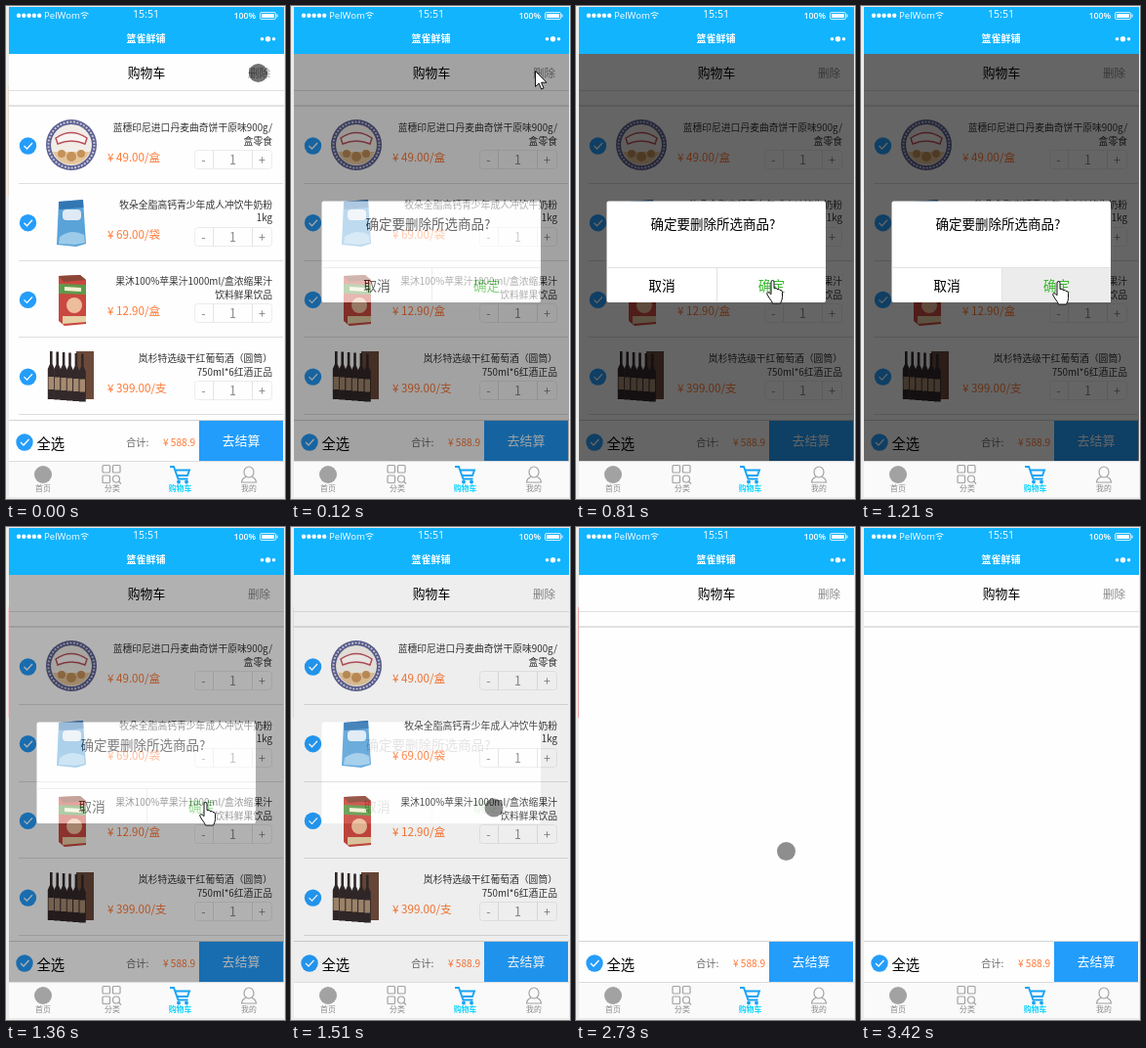
An HTML page for the animation above (3700 ms loop, 286 by 504 pixels).

```html
<!DOCTYPE html>
<html lang="zh-CN">
<head>
<meta charset="utf-8">
<title>购物车</title>
<style>
html, body { margin: 0; width: 100%; height: 100%; overflow: hidden; background: #ececea; }
svg { display: block; width: 286px; height: 504px; font-family: "Noto Sans CJK SC", "Noto Sans CJK", sans-serif; }
.latin { font-family: "Open Sans", "Noto Sans", sans-serif; }
.mid { text-anchor: middle; }
.end { text-anchor: end; }
.line { fill: none; stroke: #a2a2a2; }
.price { fill: #ff7733; }
</style>
</head>
<body>
<svg viewBox="0 0 286 504">
  <defs>
    <g id="check">
      <circle r="8.700" fill="#259dfb"/>
      <path d="M-4 0l3 3L4.500-3" fill="none" stroke="#fff" stroke-width="1.300"/>
    </g>
    <g id="photo0">
      <circle cx="67" cy="142" r="26" fill="#5a5f93"/>
      <circle cx="67" cy="142" r="23.500" fill="none" stroke="#c9c6d2" stroke-width="2" stroke-dasharray="2 1.500"/>
      <circle cx="67" cy="142" r="21" fill="#f1ece6"/>
      <path d="M51 135q16-11 32 0l-2 6q-14-6-28 0z" fill="#f8f4f2" stroke="#b8505c" stroke-width="1.500"/>
      <path d="M48 149h38q-6 13-19 13t-19-13z" fill="#e6c59a"/>
      <g fill="#c4925a"><circle cx="57" cy="151" r="4"/><circle cx="67" cy="154" r="5"/><circle cx="77" cy="151" r="4"/></g>
    </g>
    <g id="photo1">
      <path d="M54 200l25-2 3 45-10 3-20-2z" fill="#5aa3d8"/>
      <path d="M54 200l25-2 .5 8-25 2z" fill="#3276b4"/>
      <rect x="58" y="208" width="19" height="11" rx="4" fill="#dfeaf4"/>
      <path d="M55 236q12-9 25-2l1 8-10 2-17-1z" fill="#9ccbea"/>
    </g>
    <g id="photo2">
      <path d="M54 276l22-1 6 5v45l-22 2-6-5z" fill="#c9483f"/>
      <path d="M54 276l22-1 6 5-23 2z" fill="#8a4636"/>
      <path d="M54 284l28 1v10l-28-1z" fill="#5f9a4a"/>
      <path d="M60 287l17 1v4l-17-1z" fill="#f2efd2"/>
      <circle cx="70" cy="306" r="8" fill="#eebd9c"/>
      <path d="M58 317h24v6l-24 2z" fill="#e7cfa6"/>
    </g>
    <g id="photo3">
      <path d="M72 353h18v49H72z" fill="#6b4a3a"/>
      <g id="bottles"></g>
    </g>
    <path id="arrow" d="M.5.5V16.500L4.200 13 6.700 19 9 18 6.600 12.200H12z" fill="#fff" stroke="#111"/>
    <path id="hand" d="M5 2q0-1.500 1.500-1.500T8 2v6.500q3-1 3 1 3-.5 3 1 2.500-.3 2.500 2v5q0 3-2 6.500h-8q-1-3-3-5l-2.500-4q-1-2 .8-2.300 1.500 0 3.200 2z" fill="#fff" stroke="#111"/>
    <circle id="dot" r="9.500"/>
  </defs>

  <rect x="3" y="1" width="282" height="501" fill="#fefefe"/>
  <rect id="edge" x="2" y="82" width="1" height="113"/>

  <!-- header -->
  <rect x="3" y="1" width="282" height="48" fill="#12b4fe"/>
  <g fill="#fff">
    <path d="M13 9.700h22" stroke="#fff" stroke-width="4.400" stroke-linecap="round" stroke-dasharray="0 5.300"/>
    <text class="latin" x="39" y="12.500" font-size="9.600">PelWom</text>
    <path d="M76.500 8q4-3 8 0M78 10q2.500-2 5 0" fill="none" stroke="#fff"/>
    <circle cx="80.500" cy="12" r="1"/>
    <text class="latin mid" x="143.500" y="12.300" font-size="10.600">15:51</text>
    <text class="latin" x="233.500" y="13" font-size="8.800" font-weight="600">100%</text>
    <rect x="260.500" y="6.500" width="16" height="7" rx="1.500" fill="none" stroke="#fff" stroke-width=".8"/>
    <path d="M262 8h13v4h-13zM277.500 8.500h1v3h-1z"/>
    <text class="mid" x="143.500" y="37" font-size="10" font-weight="700">篮雀鲜铺</text>
    <circle cx="262.500" cy="33.700" r="1.800"/><circle cx="268.500" cy="33.700" r="2.700"/><circle cx="274.500" cy="33.700" r="1.800"/>
  </g>
  <text class="mid" x="144" y="73" font-size="12.800">购物车</text>
  <text x="248" y="72.500" font-size="11.500" fill="#888">删除</text>
  <path d="M3 86.500H285" stroke="#e0e0e0"/>
  <path d="M3 102H285" stroke="#c6c6c6"/>

  <g id="items"></g>

  <!-- checkout bar -->
  <path d="M3 423.500H285" stroke="#d4d4d4"/>
  <use href="#check" x="19" y="446"/>
  <text x="31.500" y="453" font-size="14.300">全选</text>
  <text x="123" y="449.500" font-size="10.300" fill="#666">合计:</text>
  <text class="price" x="161" y="450" font-size="10.100">¥ 588.9</text>
  <rect x="198" y="424" width="86" height="41" fill="#229dfc"/>
  <text class="mid" x="241" y="448.500" font-size="13" fill="#fff">去结算</text>

  <!-- tabs -->
  <rect x="3" y="465" width="282" height="37" fill="#fafafa"/>
  <path d="M3 465.500H285" stroke="#dcdcdc"/>
  <circle cx="38" cy="479" r="9" fill="#a2a2a2"/>
  <g class="line" stroke-width="1.200">
    <rect x="99" y="469.500" width="7.500" height="7.500" rx="1"/>
    <rect x="109.500" y="469.500" width="7.500" height="7.500" rx="1"/>
    <rect x="99" y="480" width="7.500" height="7.500" rx="1"/>
    <circle cx="113" cy="483.500" r="3.500"/><path d="M115.500 486l2.500 2.500"/>
    <ellipse cx="249" cy="476.500" rx="5" ry="5.500"/>
    <path d="M246 481.500q-4 1-4.500 5.500h15q-.5-4.500-4.500-5.500"/>
  </g>
  <g fill="none" stroke="#18a4f4" stroke-width="1.900">
    <path d="M168 471h4l4.500 12.500h10M173.500 474.500h14.500l-2 5.500h-10.500"/>
    <circle cx="177" cy="486.500" r="1"/><circle cx="185" cy="486.500" r="1"/>
  </g>
  <g class="mid" font-size="7.900" fill="#888">
    <text x="38" y="496">首页</text><text x="109" y="496">分类</text>
    <text x="178.500" y="496" fill="#10d4ff" font-weight="700">购物车</text><text x="249" y="496">我的</text>
  </g>

  <!-- confirmation -->
  <g id="modal">
    <rect x="3" y="49" width="282" height="416" opacity=".6"/>
    <rect x="31.500" y="199.500" width="224.500" height="103.500" rx="2" fill="#fff"/>
    <rect id="pressed" x="144" y="268" width="112" height="35" fill="#ececec"/>
    <path d="M31.500 267.500H256M144.500 268V303" stroke="#e2e2e2"/>
    <text x="76.500" y="228" font-size="13.500">确定要删除所选商品?</text>
    <text class="mid" x="88" y="290.500" font-size="13.800">取消</text>
    <text class="mid" x="200.500" y="290.500" font-size="13.800" fill="#35b82c">确定</text>
  </g>
  <use id="cursor"/>
</svg>
<script>
const $ = id => document.getElementById(id);
const LOOP = 3700;

const products = [
  ["蓝穗印尼进口丹麦曲奇饼干原味900g/", "盒零食", "49.00/盒"],
  ["牧朵全脂高钙青少年成人冲饮牛奶粉", "1kg", "69.00/袋"],
  ["果沐100%苹果汁1000ml/盒浓缩果汁", "饮料鲜果饮品", "12.90/盒"],
  ["岚杉特选级干红葡萄酒（圆筒）", "750ml*6红酒正品", "399.00/支"]
];

const row = ([first, second, price], i) => {
  const y = 143 + i * 78.7;
  return `<use href="#check" x="22.500" y="${y}"/><use href="#photo${i}"/>
    <g class="end" font-size="9.800" fill="#333">
      <text x="273" y="${y - 15}">${first}</text><text x="273" y="${y - 1.5}">${second}</text>
    </g>
    <text class="price" x="104" y="${y + 16}" font-size="11.600">¥ ${price}</text>
    <g transform="translate(193.500 ${Math.round(y) + 4.5})">
      <rect width="79" height="19" rx="3" fill="none" stroke="#ececec"/>
      <path d="M19 0v19M59 0v19" stroke="#e4e4e4"/>
      <g class="mid" font-size="12.500" fill="#888">
        <text x="9" y="14">-</text><text x="39" y="14.500">1</text><text x="69" y="14">+</text>
      </g>
    </g>
    <path d="M13 ${Math.round(y + 38) + .5}H284" stroke="#dedede"/>`;
};
$("items").innerHTML = products.map(row).join("");

$("bottles").innerHTML = Array.from({ length: 6 }, (_, i) => {
  const x = 43 + i * 6.4, top = 353 + i * .5;
  return `<path d="M${x + 2} ${top}h2.600v13l2.200 5v31h-7v-31l2.200-5z" fill="#33292a"/>
    <path d="M${x + .5} ${top + 26}h5.500v13h-5.500z" fill="#a58a70"/>`;
}).join("");

// Each track holds its value until the next key time.
const fadeTrack = [[0, 0], [120, .6], [270, 1], [1360, .5], [1510, .1], [1660, 0]];
const edgeTrack = [[0, "#f0dccb"], [120, "#e8e8e8"], [1360, "#f6cfcf"], [1660, "#e2e6ee"],
  [2450, "#f2c4b8"], [2730, "#f2a6a6"], [3000, "#f6e8dc"]];
const cursorTrack = [
  [0, "dot", 258.5, 68.5, .55], [120, "arrow", 250, 66], [270, "arrow", 241, 66],
  [390, "arrow", 222, 105], [540, "arrow", 206, 205], [660, "arrow", 201, 263],
  [810, "hand", 195, 280], [930, "hand", 196, 281], [1360, "hand", 198, 281],
  [1510, "dot", 208, 287, .44], [1660, "dot", 213, 275, .44], [1780, "dot", 217.5, 265.5, .44],
  [2580, "dot", 216, 263, .44], [2730, "dot", 215.5, 331.5, .44], [2850, "dot", 225, 424, .44],
  [3000, "dot", 231, 488, .44], [3150, "dot", 250, 494, .44], [3270, "arrow", 260, 498], [3420, "none", 0, 0]
];
const at = (track, t) => track.findLast(key => key[0] <= t);
const set = (id, attrs) => Object.entries(attrs).forEach(([name, value]) => $(id).setAttribute(name, value));

function draw(now) {
  const t = now % LOOP;
  const [, kind, x, y, opacity = 1] = at(cursorTrack, t);
  set("items", { opacity: t < 1660 ? 1 : 0 });
  set("modal", { opacity: at(fadeTrack, t)[1] });
  set("pressed", { opacity: t >= 1210 && t < 1360 ? 1 : 0 });
  set("edge", { fill: at(edgeTrack, t)[1] });
  set("cursor", { href: "#" + kind, x, y, opacity });
}

const start = performance.now();
function tick() {
  draw(performance.now() - start);
  requestAnimationFrame(tick);
}
tick();
</script>
</body>
</html>
```
